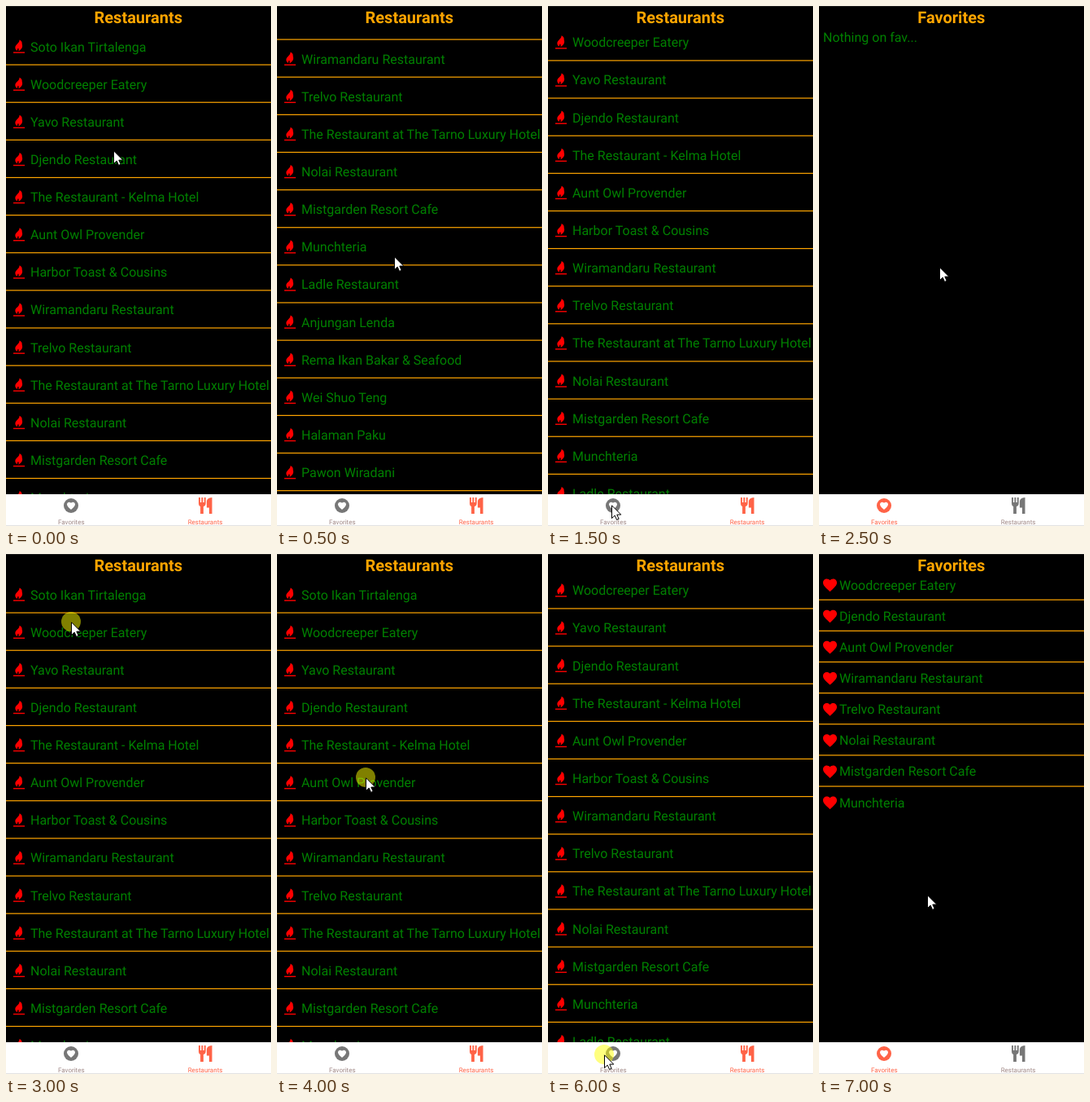
An HTML page for the animation above (8 s loop, 326 by 638 pixels).

```html
<!DOCTYPE html>
<html lang="en">
<head>
<meta charset="utf-8">
<title>Restaurants</title>
<style>
  html, body { margin: 0; width: 100%; height: 100%; overflow: hidden; background: #000; }
  svg { display: block; width: 100vw; height: 100vh; }
  text { font-family: Roboto, sans-serif; text-rendering: geometricPrecision; }
  .row { font-size: 16px; fill: #008000; }
  .title { font-size: 20px; font-weight: 700; fill: #ffa500; text-anchor: middle; }
  .label { font-size: 8px; text-anchor: middle; }
  .tab { fill: #777; }
  .tab .label { fill: #a08886; }
  .tab.active, .tab.active .label { fill: #ff6347; }
  .rule { fill: #ffa500; }
  .red { fill: #f00; }
</style>
</head>
<body>
<svg viewBox="0 0 326 638">
  <defs>
    <clipPath id="viewport"><rect y="27.5" width="326" height="572"/></clipPath>
    <path id="heart" d="M12 21.35l-1.45-1.32C5.4 15.36 2 12.28 2 8.5 2 5.42 4.42 3 7.5 3c1.74 0 3.41.81 4.5 2.09C13.09 3.81 14.76 3 16.5 3 19.58 3 22 5.42 22 8.5c0 3.78-3.4 6.86-8.55 11.54z"/>
    <g id="flame">
      <path d="M16.6 41.5C20.5 43.5 19.4 45.6 19.9 47.4C20.9 50.6 18.6 53.6 15.4 55.2C15.8 53.8 15.9 52.6 15 51.4C14.4 52.6 13.6 53.4 13.8 55C10.9 53 10.6 49.6 13 47.4C15.4 45.2 16.6 43.8 16.6 41.5z"/>
      <rect x="9" y="56.4" width="14" height="1.4"/>
    </g>
  </defs>

  <rect width="326" height="638"/>
  <rect width="326" height="1" fill="#1c1c1c"/>
  <text class="title" id="title" x="162.8" y="21"></text>
  <g clip-path="url(#viewport)"><g id="restaurants"></g></g>
  <g id="favorites"></g>
  <text class="row" id="empty" x="5" y="43.6">Nothing on fav...</text>

  <rect y="599" width="326" height="39" fill="#fff"/>
  <rect y="637" width="326" height="1" fill="#e2e2e2"/>
  <g class="tab" id="favTab">
    <circle cx="80" cy="613" r="9"/>
    <use href="#heart" fill="#fff" transform="translate(74 607.3) scale(.5)"/>
    <text class="label" x="80.3" y="635.6">Favorites</text>
  </g>
  <g class="tab" id="listTab">
    <path d="M237 603h1.9v6h1.5v-6h1.9v6h1.5v-6h1.9v7q0 3.4-2.8 4v9h-3.8v-9q-2.1-.6-2.1-4z"/>
    <path d="M253.5 603v20h-3.6v-7.5h-3v-7.5q0-4.6 6.6-5z"/>
    <text class="label" x="245" y="635.6">Restaurants</text>
  </g>

  <g id="pointer">
    <circle id="click" r="12" fill="#ff0" fill-opacity=".5"/>
    <path d="M.5 .8V16.6L4.2 13.1L6.6 18.4L9.2 17.3L6.8 12.1H11.8z" fill="#fff" stroke="#000"/>
  </g>
</svg>

<script>
const $ = id => document.getElementById(id);

const names = [
  'Soto Ikan Tirtalenga', 'Woodcreeper Eatery', 'Yavo Restaurant', 'Djendo Restaurant',
  'The Restaurant - Kelma Hotel', 'Aunt Owl Provender', 'Harbor Toast &amp; Cousins',
  'Wiramandaru Restaurant', 'Trelvo Restaurant', 'The Restaurant at The Tarno Luxury Hotel',
  'Nolai Restaurant', 'Mistgarden Resort Cafe', 'Munchteria', 'Ladle Restaurant',
  'Anjungan Lenda', 'Rema Ikan Bakar &amp; Seafood', 'Wei Shuo Teng', 'Halaman Paku',
  'Pawon Wiradani'
];
const liked = [1, 3, 5, 7, 8, 10, 11, 12];

const rule = y => `<rect class="rule" y="${y - .6}" width="326" height="1.2"/>`;

$('restaurants').innerHTML = names.map((name, i) =>
  `<g transform="translate(0 ${i * 46.13})"><use href="#flame" class="red"/>
   <text class="row" x="30" y="55.5">${name}</text>${rule(72.1)}</g>`).join('');

$('favorites').innerHTML = liked.map((index, i) =>
  `<g transform="translate(0 ${i * 38.14})">
   <use href="#heart" class="red" transform="translate(3.3 28) scale(.85)"/>
   <text class="row" x="25" y="43.6">${names[index]}</text>
   ${i < liked.length - 1 ? rule(56.2) : ''}</g>`).join('');

// Each step: page, scroll in wheel notches, pointer position, pressed
const STEP = 500, NOTCH = 51.3;
const steps = [
  ['list', 0, [132, 177]],
  ['list', 6, [144, 307]],
  ['list', 3, [144, 307]],
  ['list', 1, [78, 612]],
  ['empty', 0, null],
  ['empty', 0, [148, 320]],
  ['list', 0, [80, 83], true],
  ['list', 0, [90, 193], true],
  ['list', 0, [109, 274], true],
  ['list', 0, [132, 365], true],
  ['list', 0, [104, 418], true],
  ['list', 1, [95, 506], true],
  ['list', 1, [69, 614], true],
  ['liked', 0, null],
  ['liked', 0, [133, 418]],
  ['liked', 0, [133, 418]]
];

const show = (id, on) => $(id).setAttribute('display', on ? 'inline' : 'none');

function render([page, notches, at, pressed]) {
  const onList = page === 'list';
  $('title').textContent = onList ? 'Restaurants' : 'Favorites';
  show('restaurants', onList);
  show('favorites', page === 'liked');
  show('empty', page === 'empty');
  $('listTab').classList.toggle('active', onList);
  $('favTab').classList.toggle('active', !onList);
  $('restaurants').setAttribute('transform', `translate(0 ${-notches * NOTCH})`);
  show('pointer', at);
  show('click', pressed);
  if (at) $('pointer').setAttribute('transform', `translate(${at})`);
}

const start = performance.now();
let current = -1;
function tick() {
  const index = Math.floor((performance.now() - start) / STEP) % steps.length;
  if (index !== current) render(steps[current = index]);
  requestAnimationFrame(tick);
}
tick();
</script>
</body>
</html>
```
